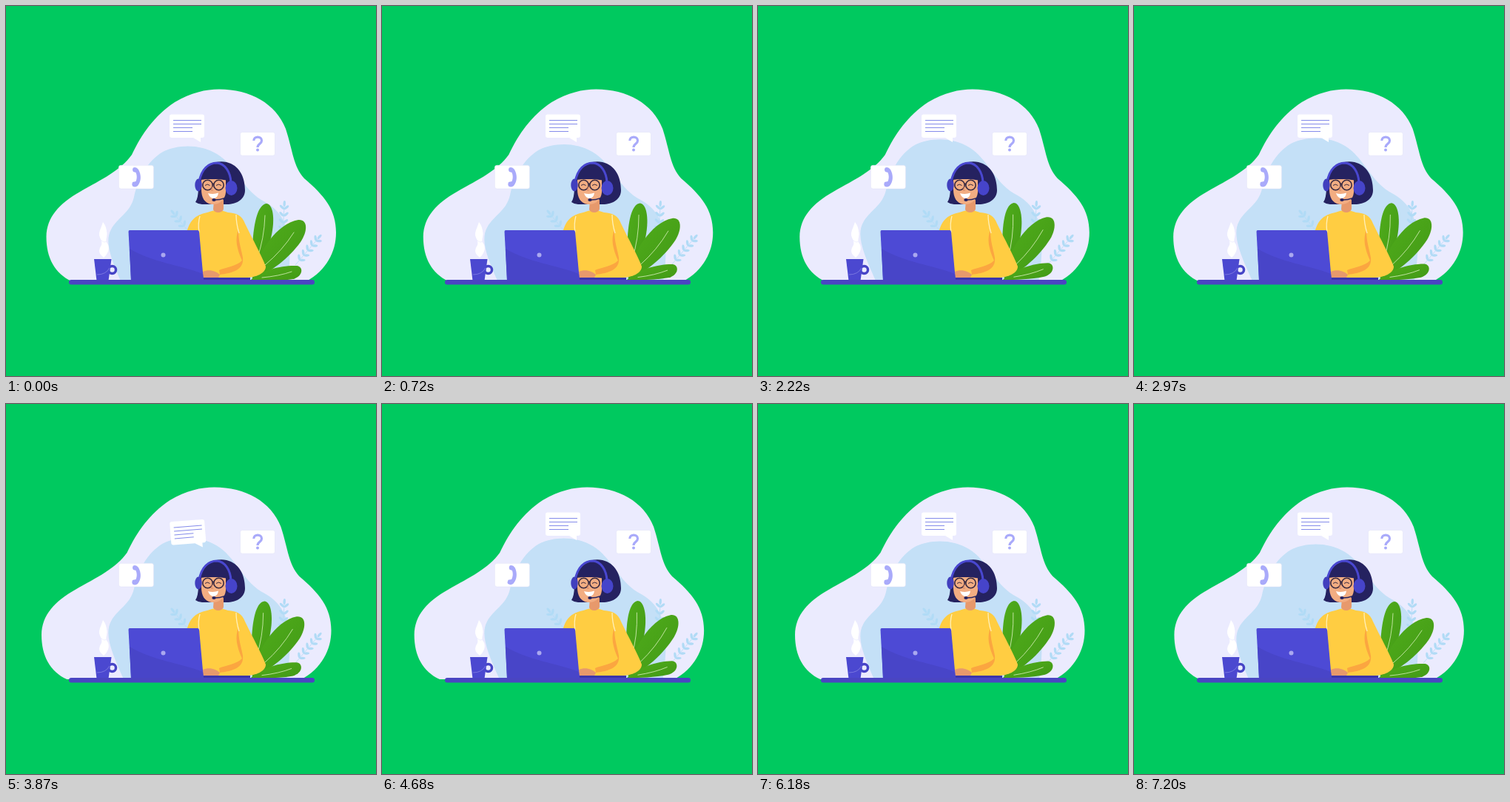
These frames come from a looping animation (500x500 px, 7.23 s). An HTML page:

```html
<!DOCTYPE html>
<html lang="en">
<head>
<meta charset="utf-8">
<title>Support desk</title>
<style>
  html, body { margin: 0; width: 100%; height: 100%; overflow: hidden; background: #00c95f; }
  svg { display: block; width: 100%; height: 100%; }
</style>
</head>
<body>
<svg viewBox="0 0 500 500">
  <defs>
    <clipPath id="aboveDesk"><rect width="500" height="372"/></clipPath>
    <linearGradient id="leafFill" x1="0" y1="0" x2="1" y2="1">
      <stop offset="0" stop-color="#50ad1b"/><stop offset="1" stop-color="#429916"/>
    </linearGradient>
  </defs>
  <rect width="500" height="500" fill="#00c95f"/>

  <g clip-path="url(#aboveDesk)">
    <path id="cloud" fill="#ebebfe" d="M100 376C70 368 54.5 345 54.5 312C55 285 72 267 100 251C130 234 155 222 170 201C184 172 200 149 228 130C250 117 270 112.500 288 112.500C330 112.500 365 132 378 166C388 197 388 216 403 233C430 256 446 275 446 306C446 335 430 362 398 376Z"/>
    <path id="hill" fill="#c4e0f7" d="M168 400C146 352 131 322 142 302C150 286 168 280 173 258C178 235 190 210 212 197C232 187 262 186 285 200C310 215 318 245 345 262C375 278 395 300 376 400Z"/>
  </g>
  <g id="twigs" fill="#b1dbf6" stroke="#b1dbf6"></g>

  <g id="plant" stroke-linecap="round">
    <g fill="url(#leafFill)">
      <path d="M333 369C331 325 334 269 352 267C366 268 367 319 333 369Z"/>
      <path d="M333 369C337 335 367 293 395 289C408 288 408 304 398 319C383 340 357 361 333 369Z"/>
      <path d="M331 370C345 357 373 350 393 351C402 352 402 365 388 369C368 372 348 371 331 370Z"/>
    </g>
    <g fill="none" stroke="#c9e9aa" stroke-width=".9">
      <path d="M339 342Q349 315 350 283"/>
      <path d="M350 350Q373 331 389 306"/>
      <path d="M346 367Q369 365 386 359"/>
    </g>
  </g>

  <g id="woman">
    <path fill="#ffcd42" d="M243 310C248 289 255 283 272 279Q286 273 300 279C312 280 319 283 323 294C333 315 345 336 351 352C351 361 338 367 324 367L262 368L250 320Z"/>
    <path fill="#fba640" d="M314 302C309 316 312 328 319 344C311 352 297 353 288 357L289 363C305 361 322 357 320 340C318 328 314 319 314 302Z"/>
    <path fill="none" stroke="#fff0b8" stroke-width="1.300" d="M262 284Q259 294 261 306M311 282Q311 294 315 307"/>
    <path fill="#e7996c" d="M266 359C274 355 284 358 289 363L287 367L266 368Z"/>
    <path fill="#252260" d="M256 265C262 257 258 240 264 228C270 214 284 208 298 211C315 215 323 231 323 249C323 261 312 268 298 268L265 268Q260 268 256 265Z"/>
    <path fill="#e7996c" d="M281 262H294V274C293 280 282 281 280 275Z"/>
    <path fill="#f2ad82" d="M264 234H297V252C296 263 287 269 278 268C268 267 264 258 264 248Z"/>
    <path fill="#252260" d="M263 235C266 220 280 216 300 224L301 236Q280 232 263 235Z"/>
    <g fill="none" stroke="#392a41">
      <g stroke-width="1.600"><circle cx="272.500" cy="242" r="6.700"/><circle cx="287.500" cy="242" r="6.700"/><path d="M279 241Q280 239.500 281 241"/></g>
      <path d="M269 242.500Q272 239.500 275.500 242.500M284 242.500Q287 239.500 291 242.500"/>
    </g>
    <path fill="none" stroke="#d78563" d="M279 244L277 249H280"/>
    <path fill="#fff" d="M273 253Q280 255 287 252.500Q286 260 280 260Q275 259 273 253Z"/>
    <g fill="none" stroke="#4947d0" stroke-linecap="round">
      <path stroke-width="3" d="M261 238C264 220 274 212 285 212C296 213 303 224 304 238"/>
      <path stroke="#2a265e" stroke-width="1.300" d="M304 253Q297 262 282 262"/>
    </g>
    <ellipse cx="260" cy="242" rx="4.700" ry="8.500" fill="#413fbe"/>
    <ellipse cx="304.500" cy="246" rx="8" ry="10" fill="#4644ca"/>
    <ellipse cx="281" cy="262" rx="2.700" ry="2" fill="#252260"/>
  </g>

  <g id="laptop">
    <path fill="#3b36aa" d="M262 367H330V371H262Z"/>
    <path fill="#4d4ad5" d="M167 303H259Q260.500 303 261 305L267 371H169L165.500 305Q165.500 303 167 303Z"/>
    <path fill="#4845c8" d="M167 328C200 347 235 350 266 362L267 371H169Z"/>
    <circle cx="212.500" cy="336.500" r="3" fill="#aaa8ef"/>
  </g>

  <g id="mug">
    <path fill="#fff" d="M131 292C128 302 124 306 127 313C129 317 130 319 129 323C126 328 124 333 130 338L132 340C138 335 141 327 137 321C133 317 138 311 136 304Q135 297 131 292Z"/>
    <path fill="none" stroke="#ebebfe" stroke-width=".8" d="M127 315Q132 321 136 318"/>
    <circle cx="143.500" cy="356.500" r="5" fill="none" stroke="#4644c6" stroke-width="3.500"/>
    <path fill="#4b48d0" d="M119 342H142.500L138.500 371H122.500Z"/>
    <path fill="none" stroke="#8582e2" stroke-width=".8" d="M123 363Q135 363 140 354"/>
  </g>
  <rect x="85" y="370" width="332" height="6.500" rx="3.200" fill="#4a45c2"/>

  <g id="message">
    <path fill="#fff" d="M224 146.500H265Q268 146.500 268 149.500V175Q268 178 265 178H263V184L253 178H224Q221 178 221 175V149.500Q221 146.500 224 146.500Z"/>
    <path stroke="#848bea" d="M226 154.500H264M226 159.500H264M226 164.500H252M226 169.500H252"/>
  </g>
  <g fill="#fff" stroke="#dddff5" stroke-width=".5">
    <rect x="152.300" y="215.300" width="47.200" height="31.700" rx="3"/>
    <rect x="316.500" y="170.500" width="47" height="31.700" rx="3"/>
  </g>
  <path id="phone" fill="#a9aafa" d="M172 218.500Q176 217 179 221C183 228 183 237 178 243Q175 245.500 171 243.500Q169.500 241 171 238L175.500 237Q178 231 175.500 225L172 224Q170 221 172 218.500Z"/>
  <path fill="none" stroke="#a9aafa" stroke-width="3.200" d="M334.800 182C334.800 175.500 345.500 175.500 345.500 182C345.500 186.500 340 186 340 191"/>
  <circle cx="340" cy="194.500" r="2" fill="#a9aafa"/>
</svg>
<script>
const LOOP = 7230, STEP = 30;
const el = id => document.getElementById(id);
const place = (id, transform) => el(id).setAttribute('transform', transform);

// A stem with paired leaflets and one at its tip.
function twig(x0, y0, x1, y1, pairs) {
  const dir = Math.atan2(y1 - y0, x1 - x0) * 180 / Math.PI;
  const leaflet = (x, y, turn) =>
    `<ellipse cx="4" rx="4" ry="1.700" stroke="none" transform="translate(${x} ${y}) rotate(${dir + turn})"/>`;
  let out = `<path d="M${x0} ${y0}L${x1} ${y1}" stroke-width=".8"/>` + leaflet(x1, y1, 0);
  for (let i = 1; i <= pairs; i++) {
    const k = i / (pairs + .4), x = x0 + (x1 - x0) * k, y = y0 + (y1 - y0) * k;
    out += leaflet(x, y, 48) + leaflet(x, y, -48);
  }
  return out;
}
el('twigs').innerHTML =
  twig(246, 304, 228, 282, 3) + twig(372, 340, 376, 271, 7) + twig(391, 350, 421, 315, 5);

// Smooth periodic curve through [time, value] keys; the first key is at 0.
function track(keys, t) {
  const n = keys.length;
  const key = i => {
    const turns = Math.floor(i / n), [time, value] = keys[i - turns * n];
    return [time + turns * LOOP, value];
  };
  let i = 0;
  while (i < n - 1 && keys[i + 1][0] <= t) i++;
  const [a, b, c, d] = [-1, 0, 1, 2].map(o => key(i + o));
  const span = c[0] - b[0], u = (t - b[0]) / span;
  const m0 = (c[1] - a[1]) / (c[0] - a[0]) * span;
  const m1 = (d[1] - b[1]) / (d[0] - b[0]) * span;
  return (2 * u ** 3 - 3 * u * u + 1) * b[1] + (u ** 3 - 2 * u * u + u) * m0
    + (3 * u * u - 2 * u ** 3) * c[1] + (u ** 3 - u * u) * m1;
}

const bump = (t, from, to) =>
  t < from || t > to ? 0 : (1 - Math.cos(2 * Math.PI * (t - from) / (to - from))) / 2;

const cloudX = [[0, 0], [750, 1.3], [1650, 2.8], [2250, 1.7], [3000, -1.5], [3870, -6.5], [4800, -11.2], [5280, -9.5], [6180, -4.5]];
const hillY = [[0, 0], [1410, -6], [2900, -11], [3870, -8.5], [4680, -8], [6180, -4]];
const sway = [[0, 0], [1410, -4], [2970, -2.4], [3700, -1.3], [4680, -3.7], [6180, -3.4]];

function draw(t) {
  place('cloud', `translate(${track(cloudX, t)} 0)`);
  place('hill', `translate(0 ${track(hillY, t)})`);
  place('plant', `rotate(${track(sway, t)} 333 369)`);
  const nod = bump(t, 3240, 4500);
  place('message', `translate(${1.2 * nod} ${11 * nod}) rotate(${-4.5 * nod} 244 162)`);
  place('phone', `rotate(${14 * bump(t, 1050, 1770) + 4 * bump(t, 4360, 5000)} 176 231)`);
}

const start = performance.now();
function frame() {
  const t = (performance.now() - start) % LOOP;
  draw(Math.floor(t / STEP) * STEP);
  requestAnimationFrame(frame);
}
frame();
</script>
</body>
</html>
```
